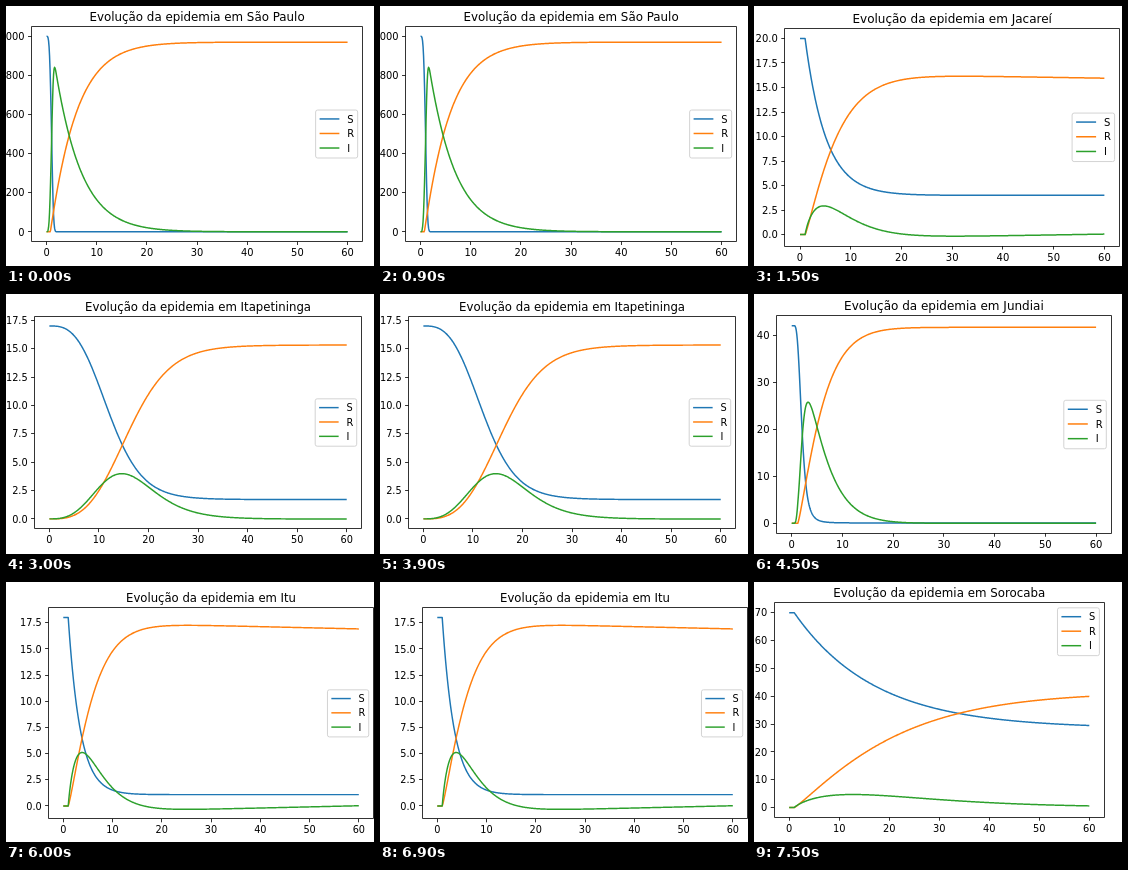
An HTML page with a canvas for the animation above (8 s loop, 368x260 px).

```html
<!DOCTYPE html>
<html lang="pt">
<head>
<meta charset="utf-8">
<style>
  html, body { margin: 0; width: 100%; height: 100%; overflow: hidden; background: #fff; }
  canvas { display: block; }
</style>
</head>
<body>
<canvas id="stage" width="368" height="260"></canvas>
<script>
const ctx = document.getElementById('stage').getContext('2d');
const LOOP = 8000, HOLD = 1500, DAYS = 60, SAMPLES = 600;
const BLUE = '#1f77b4', ORANGE = '#ff7f0e', GREEN = '#2ca02c';

// Falls from 1 to 0 after a delay: a stretched exponential, with a longer tail for larger `tail`
function decay(t, { delay = 0, scale, power = 1, tail = 0.001 }) {
  const x = (Math.max(0, t - delay) / scale) ** power;
  return (1 + tail * x) ** (-1 / tail);
}

// S falls from `population` to `floor`; R rises to `ceiling`, then loses `drift` over the whole
// span; I is what remains. `survival` is the share of the removed who are counted in R.
const cities = [
  { city: 'São Paulo', left: 25.5, top: 20.5, s: 0.989, step: 200, digits: 0,
    population: 1000, floor: 0, ceiling: 970, survival: 0.97,
    fall: { scale: 1.1, power: 3.7 },
    rise: { delay: 0.75, scale: 5.23, power: 1.04 } },
  { city: 'Jacareí', left: 30.8, top: 22.6, s: 1, step: 2.5, digits: 1,
    population: 20, floor: 4, ceiling: 16.45, drift: 0.5,
    fall: { delay: 1, scale: 4.1 },
    rise: { delay: 1, scale: 6.55, power: 1.17 } },
  { city: 'Itapetininga', left: 28.5, top: 22.3, s: 0.977, step: 2.5, digits: 1,
    population: 17, floor: 1.7, ceiling: 15.32,
    fall: { scale: 13.1, power: 2.95, tail: 0.333 },
    rise: { scale: 17.3, power: 3.1, tail: 0.333 } },
  { city: 'Jundiai', left: 22.5, top: 21.8, s: 1, step: 10, digits: 0,
    population: 42, floor: 0.05, ceiling: 41.65, survival: 0.992,
    fall: { delay: 0.5, scale: 1.57, power: 2.7, tail: 0.6 },
    rise: { delay: 1.2, scale: 5.2, power: 1.22 } },
  { city: 'Itu', left: 42.5, top: 25.8, s: 0.971, step: 2.5, digits: 1,
    population: 18, floor: 1.08, ceiling: 17.55, drift: 0.65,
    fall: { delay: 1, scale: 2.45 },
    rise: { delay: 1, scale: 5.35, power: 1.21 } },
  { city: 'Sorocaba', left: 20.2, top: 20.9, s: 0.986, step: 10, digits: 0, legendTop: true,
    population: 70, floor: 28.4, ceiling: 41.5,
    fall: { delay: 1, scale: 16.1 },
    rise: { delay: 1, scale: 20.8, power: 1.14 } },
];

function sampleCurves({ population, floor, ceiling, survival = 1, drift = 0, fall, rise }) {
  const S = t => floor + (population - floor) * decay(t, fall);
  const R = t => ceiling * (1 - decay(t, rise)) - drift * t / DAYS * (1 - decay(t, rise));
  const I = t => population - S(t) - R(t) / survival;
  const sample = f => Array.from({ length: SAMPLES + 1 }, (_, i) => f(i * DAYS / SAMPLES));
  return [
    { name: 'S', color: BLUE, values: sample(S) },
    { name: 'R', color: ORANGE, values: sample(R) },
    { name: 'I', color: GREEN, values: sample(I) },
  ];
}

// The axes leave a margin of 5 % of the data range on each side
function layOut(config) {
  const { left, top, s } = config;
  const curves = sampleCurves(config);
  const all = curves.flatMap(c => c.values);
  const low = Math.min(...all), high = Math.max(...all), range = high - low;
  const width = 334.8 * s, height = 217.44 * s;
  return {
    ...config, curves, right: left + width, bottom: top + height,
    highest: high + range * 0.05,
    toX: t => left + width * (t / DAYS + 0.05) / 1.1,
    toY: v => top + height * ((high - v) / range + 0.05) / 1.1,
  };
}

const charts = cities.map(layOut);
const snap = v => Math.floor(v) + 0.5;

function line(points, color, width) {
  ctx.beginPath();
  for (const [x, y] of points) ctx.lineTo(x, y);
  ctx.strokeStyle = color;
  ctx.lineWidth = width;
  ctx.stroke();
}

function label(text, x, y, size, align) {
  ctx.font = `${size}px "DejaVu Sans", sans-serif`;
  ctx.textAlign = align;
  ctx.fillStyle = '#000';
  ctx.fillText(text, x, y);
}

function drawTicks({ left, bottom, s, step, digits, highest, toX, toY }) {
  for (let t = 0; t <= DAYS; t += 10) {
    const x = snap(toX(t));
    line([[x, bottom], [x, bottom + 3.5 * s]], '#000', 0.8);
    label(t, toX(t), bottom + 15 * s, 10 * s, 'center');
  }
  for (let v = 0; v <= highest; v += step) {
    const y = snap(toY(v));
    line([[left, y], [left - 3.5 * s, y]], '#000', 0.8);
    label(v.toFixed(digits), left - 7 * s, toY(v) + 3.8 * s, 10 * s, 'right');
  }
}

function drawLegend({ top, right, bottom, s, curves, legendTop }) {
  const w = 42.5 * s, h = 48.5 * s;
  const x = right - 5 * s - w;
  const y = legendTop ? top + 5 * s : (top + bottom - h) / 2;
  ctx.beginPath();
  ctx.roundRect(x, y, w, h, 2);
  ctx.fillStyle = 'rgba(255,255,255,.8)';
  ctx.fill();
  ctx.strokeStyle = '#d3d3d3';
  ctx.lineWidth = 1;
  ctx.stroke();
  curves.forEach(({ name, color }, i) => {
    const rowY = y + (9 + 14.7 * i) * s;
    line([[x + 4 * s, rowY], [x + 24 * s, rowY]], color, 1.5 * s);
    label(name, x + 32 * s, rowY + 3.7 * s, 10 * s, 'left');
  });
}

function drawChart(chart) {
  const { city, left, top, right, bottom, s, curves, toX, toY } = chart;
  ctx.fillStyle = '#fff';
  ctx.fillRect(0, 0, 368, 260);
  ctx.lineJoin = 'round';
  drawTicks(chart);
  for (const { color, values } of curves) {
    line(values.map((v, i) => [toX(i * DAYS / SAMPLES), toY(v)]), color, 1.5 * s);
  }
  ctx.strokeStyle = '#000';
  ctx.lineWidth = 0.8;
  ctx.strokeRect(snap(left), snap(top), snap(right) - snap(left), snap(bottom) - snap(top));
  label(`Evolução da epidemia em ${city}`, (left + right) / 2, top - 5.5 * s, 12 * s, 'center');
  drawLegend(chart);
}

function frame() {
  drawChart(charts[Math.floor(performance.now() % LOOP / HOLD)]);
  requestAnimationFrame(frame);
}
frame();
</script>
</body>
</html>
```
